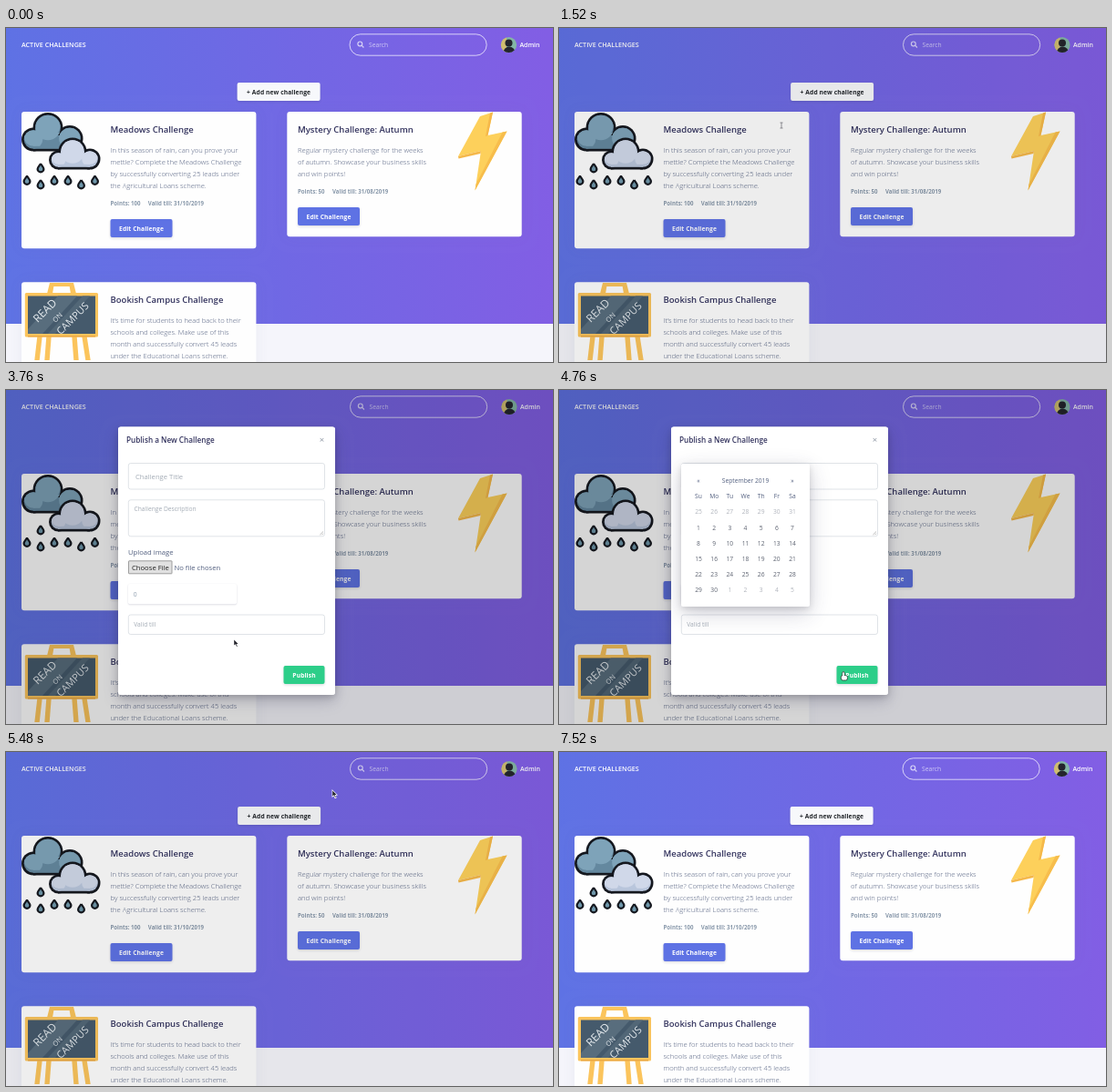
An HTML page with a canvas for the animation above (7.56 s loop, 600 by 367 pixels).

```html
<!DOCTYPE html>
<html lang="en">
<head>
<meta charset="utf-8">
<title>Active challenges</title>
<style>
html, body { margin: 0; width: 100%; height: 100%; overflow: hidden; background: #f5f5fb; }
canvas { display: block; width: 600px; height: 367px; }
</style>
</head>
<body>
<canvas id="stage"></canvas>
<script>
const W = 600, H = 367, LOOP = 7560;
const canvas = document.getElementById('stage');
const ctx = canvas.getContext('2d');
const dpr = window.devicePixelRatio || 1;
canvas.width = W * dpr;
canvas.height = H * dpr;

const INK = '#32325d', BODY = '#525f7f', MUTED = '#8898aa', HINT = '#a3abb5';
const BLUE = '#5e72e4', GREEN = '#2dce89', DARK = '#15181f';
const SMALL = 6.69, BASE = 7.65;

const clamp = v => Math.max(0, Math.min(1, v));
const ramp = (t, start, length) => clamp((t - start) / length);
const easeOut = p => 1 - (1 - p) ** 2;
const smooth = p => p * p * (3 - 2 * p);

// ---- drawing helpers ----
function text(str, x, y, size, color, weight = 400, align = 'left', spacing = 0) {
  ctx.font = `${weight} ${size}px "Open Sans", sans-serif`;
  ctx.letterSpacing = spacing + 'px';
  ctx.textAlign = align;
  ctx.fillStyle = color;
  ctx.fillText(str, x, y);
}

function box(x, y, w, h, r, fill, stroke, line = 0.6) {
  ctx.beginPath();
  ctx.roundRect(x, y, w, h, r);
  if (fill) { ctx.fillStyle = fill; ctx.fill(); }
  if (stroke) { ctx.strokeStyle = stroke; ctx.lineWidth = line; ctx.stroke(); }
}

function shadowBox(x, y, w, h, r, fill, blur, dy, color) {
  ctx.save();
  ctx.shadowColor = color;
  ctx.shadowBlur = blur * dpr;
  ctx.shadowOffsetY = dy * dpr;
  box(x, y, w, h, r, fill);
  ctx.restore();
}

function shape(points, fill) {
  ctx.beginPath();
  points.forEach(([x, y]) => ctx.lineTo(x, y));
  ctx.closePath();
  ctx.fillStyle = fill;
  ctx.fill();
}

function disc(x, y, r, fill) {
  ctx.beginPath();
  ctx.arc(x, y, r, 0, Math.PI * 2);
  ctx.fillStyle = fill;
  ctx.fill();
}

function button(label, x, y, w, fill, color) {
  shadowBox(x, y, w, 20, 2, fill, 3, 1.2, 'rgba(30,30,60,.16)');
  text(label, x + w / 2, y + 12.7, SMALL, color, 700, 'center', 0.1);
}

// ---- illustrations ----
function cloud(lobes, base, fill, shade) {
  const line = 2.7;
  const puff = (grow, color, dy = 0) => {
    lobes.forEach(([x, y, r]) => disc(x, y + dy, r + grow, color));
    const [x, y, w, h] = base;
    ctx.fillRect(x, y + dy, w, h + grow);
  };
  puff(0, DARK);
  puff(-line, shade);
  ctx.save();
  ctx.beginPath();
  lobes.forEach(([x, y, r]) => {
    ctx.moveTo(x + r - line, y);
    ctx.arc(x, y, r - line, 0, Math.PI * 2);
  });
  ctx.clip();
  puff(-line, fill, -3);
  ctx.restore();
}

function drop(x, y) {
  ctx.beginPath();
  ctx.moveTo(x, y - 4.5);
  ctx.bezierCurveTo(x + 1.5, y - 2, x + 3.4, y - 0.4, x + 3.4, y + 1.4);
  ctx.arc(x, y + 1.4, 3.4, 0, Math.PI);
  ctx.bezierCurveTo(x - 3.4, y - 0.4, x - 1.5, y - 2, x, y - 4.5);
  ctx.fillStyle = '#6f97aa';
  ctx.fill();
  ctx.strokeStyle = DARK;
  ctx.lineWidth = 2.2;
  ctx.stroke();
}

function rain() {
  cloud([[30, 122.5, 13], [46, 109.5, 16.5], [70, 121.5, 14.5]], [30, 118, 40, 17.5], '#7ea3b9', '#64889f');
  cloud([[57.5, 145, 10.5], [73, 136, 15.5], [92, 144, 11.5]], [57, 143, 35, 12.5], '#d0d8e9', '#b9c6dc');
  [[38, 153.5], [23, 167], [53, 167], [38, 171.5], [68, 167], [82.5, 171.5], [97.5, 167]].forEach(p => drop(...p));
}

function bolt() {
  shape([[520, 97], [534, 92.5], [528.5, 118], [549.5, 113.5], [514.5, 178.5], [521, 135], [496, 141]], '#fdd05b');
  shape([[534, 92.5], [528.5, 118], [526, 119], [531, 93.5]], '#f5b84a');
  shape([[549.5, 113.5], [514.5, 178.5], [515.4, 172], [544.5, 114.5]], '#f7bd4c');
  shape([[496, 141], [521, 135], [520.5, 138], [496.5, 143.5]], '#f5b84a');
}

function boardWord(word, x, y, size) {
  ctx.save();
  ctx.translate(x, y);
  ctx.rotate(-Math.PI / 4);
  text(word, 0, size * 0.36, size, '#e8edf0', 500, 'center');
  ctx.restore();
}

function easel() {
  const wood = '#fbc45c', edge = '#eca943';
  const leg = (top, foot) => shape([[top - 2.7, 339], [top + 2.7, 339], [foot + 2.7, 365], [foot - 2.7, 365]], wood);
  shape([[48, 280], [53, 280], [51, 292], [45, 292]], wood);
  shape([[69, 280], [74, 280], [77, 292], [71, 292]], wood);
  box(48, 280, 26, 4, 0, wood);
  leg(37, 34);
  leg(47, 45);
  leg(75, 77);
  leg(86, 90);
  box(20.8, 291, 80.2, 48.5, 1.5, wood);
  box(24, 338, 74, 1.5, 0, edge);
  box(24, 294.5, 74, 41.5, 0, '#455a6c');
  shape([[57, 294.5], [78, 294.5], [40, 336], [24, 336], [24, 331]], '#586d7d');
  shape([[84, 294.5], [92, 294.5], [54, 336], [46, 336]], '#526777');
  boardWord('READ', 42.5, 310.5, 12);
  boardWord('ON', 56.5, 318, 7.5);
  boardWord('CAMPUS', 73, 319, 11);
}

// ---- page ----
function card(x, y, h, title, lines, points, until, textX) {
  shadowBox(x, y, 257.4, h + 0.3, 3, '#fefefe', 15, 0, 'rgba(100,110,140,.08)');
  text(title, textX, y + 22.8, 9.5, INK, 600);
  lines.forEach((s, i) => text(s, textX, y + 44.5 + i * 13, BASE, BODY, 300));
  const foot = y + 34 + lines.length * 13;
  text('Points: ' + points, textX, foot + 17.3, 6.12, MUTED, 700);
  text('Valid till: ' + until, textX + (points > 99 ? 41.3 : 38), foot + 17.3, 6.12, MUTED, 700);
  button('Edit Challenge', textX, foot + 32, 68, BLUE, '#fff');
}

function header(shift) {
  text('ACTIVE CHALLENGES', 17, 20.8, 7.17, '#fff', 600);
  ctx.save();
  ctx.translate(shift, 0);
  box(377, 6.8, 150.2, 23.4, 11.7, null, 'rgba(255,255,255,.7)', 1);
  ctx.strokeStyle = 'rgba(255,255,255,.7)';
  ctx.lineWidth = 1.2;
  ctx.beginPath();
  ctx.arc(388.3, 17.4, 2.4, 0, Math.PI * 2);
  ctx.moveTo(390.1, 19.2);
  ctx.lineTo(392.4, 21.5);
  ctx.stroke();
  text('Search', 398, 20.9, SMALL, 'rgba(255,255,255,.65)');

  ctx.save();
  ctx.beginPath();
  ctx.arc(551.5, 18.5, 8.6, 0, Math.PI * 2);
  ctx.clip();
  box(542, 9, 20, 20, 0, '#83b5a6');
  box(542, 9, 7, 20, 0, '#d0bd70');
  disc(551.5, 16.5, 4, '#24252d');
  disc(552, 27, 6.5, '#24252d');
  ctx.restore();
  text('Admin', 563.4, 21, 7, '#fff', 600);
  button('+ Add new challenge', 253.6, 60, 91, '#f7f8fb', '#212529');
  ctx.restore();
}

function page(shift) {
  ctx.fillStyle = '#f5f5fb';
  ctx.fillRect(0, 0, W, H);
  const g = ctx.createLinearGradient(0, 178, W, 147);
  g.addColorStop(0, '#5e72e4');
  g.addColorStop(1, '#825ee4');
  ctx.fillStyle = g;
  ctx.fillRect(0, 0, W, 325);
  header(shift);
  card(17, 92, 150, 'Meadows Challenge', [
    'In this season of rain, can you prove your',
    'mettle? Complete the Meadows Challenge',
    'by successfully converting 25 leads under',
    'the Agricultural Loans scheme.'
  ], 100, '31/10/2019', 114.5);
  card(308.3, 92, 137, 'Mystery Challenge: Autumn', [
    'Regular mystery challenge for the weeks',
    'of autumn. Showcase your business skills',
    'and win points!'
  ], 50, '31/08/2019', 320);
  card(17, 279.3, 150, 'Bookish Campus Challenge', [
    'It\u2019s time for students to head back to their',
    'schools and colleges. Make use of this',
    'month and successfully convert 45 leads',
    'under the Educational Loans scheme.'
  ], 100, '30/09/2019', 114.5);
  rain();
  bolt();
  easel();
}

// ---- dialog ----
function field(y, h, hint, x, size) {
  box(134.3, y, 215.2, h, 2.5, '#fff', '#cad1d7');
  text(hint, x, y + h / 2 + size * 0.36, size, HINT);
}

function modal(alpha, dy) {
  ctx.save();
  ctx.globalAlpha = alpha;
  ctx.translate(0, dy);
  shadowBox(123, 40.5, 238, 294.5, 3, '#fff', 17, 7, 'rgba(50,50,93,.25)');
  shadowBox(123, 40.5, 238, 294.5, 3, '#fff', 7, 2.4, 'rgba(0,0,0,.17)');
  text('Publish a New Challenge', 132, 57.6, 8.2, INK, 600);
  text('\u00d7', 346.5, 57.6, 9.5, '#8e96a3', 400, 'center');
  field(80.5, 28.5, 'Challenge Title', 142, BASE);
  box(134.3, 120.8, 215.2, 40, 2.5, '#fff', '#cad1d7');
  text('Challenge Description', 140.5, 133.4, SMALL, HINT);
  ctx.beginPath();
  ctx.moveTo(344.3, 159.2); ctx.lineTo(348, 155.5);
  ctx.moveTo(346.5, 159.2); ctx.lineTo(348, 157.7);
  ctx.strokeStyle = '#777';
  ctx.lineWidth = 0.5;
  ctx.stroke();
  text('Upload image', 134, 180.6, BASE, BODY);
  box(134.5, 187.8, 47.5, 14, 0.5, '#e1e1e1', '#8a8a8a', 0.8);
  text('Choose File', 138, 197.6, BASE, '#222');
  text('No file chosen', 184.5, 197.6, BASE, BODY);
  shadowBox(134, 213, 119, 22.3, 2, '#fff', 2, 0.7, 'rgba(50,50,93,.2)');
  text('0', 139.8, 226.8, SMALL, MUTED);
  field(247, 21.5, 'Valid till', 140.2, SMALL);
  button('Publish', 304.5, 303, 45, GREEN, '#fff');
  ctx.restore();
}

function picker(alpha, dy) {
  ctx.save();
  ctx.globalAlpha = alpha;
  ctx.translate(0, dy);
  shadowBox(134, 81, 141, 157, 2.5, '#fff', 24, 7, 'rgba(50,50,93,.22)');
  shadowBox(134, 81, 141, 157, 2.5, '#fff', 7, 2.4, 'rgba(0,0,0,.14)');
  const cell = (s, col, y, color) => text(s, 153 + col * 17.17, y + 2.4, SMALL, color, 400, 'center');
  cell('\u00ab', 0, 100, BODY);
  cell('September 2019', 3, 100, BODY);
  cell('\u00bb', 6, 100, BODY);
  ['Su', 'Mo', 'Tu', 'We', 'Th', 'Fr', 'Sa'].forEach((d, i) => cell(d, i, 117, BODY));
  for (let i = 0; i < 42; i++) {
    const n = i - 6;
    const day = n < 1 ? n + 31 : n > 30 ? n - 30 : n;
    cell(day, i % 7, 134 + Math.floor(i / 7) * 17.2, day === n ? '#5c6270' : '#b0b4bc');
  }
  ctx.restore();
}

// ---- pointer: time, x, y, look until the next stop ----
const STOPS = [
  [40, 420, 372, 'arrow'], [320, 350, 150, 'arrow'], [760, 350, 150, 'arrow'],
  [1000, 300, 72, 'hand'], [1240, 300, 72, 'arrow'], [1480, 244, 107, 'beam'],
  [1720, 244, 107, 'beam'], [2000, 236, 93, 'beam'], [2320, 236, 93, 'beam'],
  [2640, 232, 140, 'beam'], [3000, 215, 215, 'beam'], [3080, 215, 215, 'arrow'],
  [3240, 205, 240, 'arrow'], [3480, 205, 240, 'arrow'], [3760, 250, 274, 'arrow'],
  [4000, 256, 258, 'beam'], [4380, 256, 258, 'arrow'], [4640, 312, 310, 'hand'],
  [4840, 312, 310, 'arrow'], [5060, 346, 54, 'hand'], [5200, 346, 54, 'arrow'],
  [5480, 358, 42, 'arrow'], [5900, 358, 42, 'arrow'], [6200, 420, -12, 'arrow']
];

const LOOKS = {
  arrow() {
    shape([[-0.4, -0.9], [-0.4, 8], [1.5, 6.4], [2.8, 9.2], [4.7, 8.3], [3.5, 5.8], [6, 5.6]], '#fff');
    shape([[0.2, 0.5], [0.2, 6.6], [1.8, 5.3], [3.1, 8.1], [3.8, 7.8], [2.5, 5], [4.6, 4.9]], '#24242c');
  },
  hand() {
    box(-1.2, -0.4, 2.4, 7, 1.2, '#fff', '#222', 0.7);
    box(-2.6, 3.5, 7, 5.5, 2, '#fff', '#222', 0.7);
    box(-0.8, 1, 1.6, 5, 0.8, '#fff');
  },
  beam() {
    ctx.beginPath();
    ctx.moveTo(-1.5, -3); ctx.lineTo(1.5, -3);
    ctx.moveTo(0, -3); ctx.lineTo(0, 3);
    ctx.moveTo(-1.5, 3); ctx.lineTo(1.5, 3);
    ctx.strokeStyle = '#63636a';
    ctx.lineWidth = 0.7;
    ctx.stroke();
  }
};

function pointer(t) {
  const i = STOPS.findIndex(s => s[0] > t);
  if (i < 1) return;
  const [t0, x0, y0, look] = STOPS[i - 1], [t1, x1, y1] = STOPS[i];
  const p = smooth((t - t0) / (t1 - t0));
  ctx.save();
  ctx.translate(x0 + (x1 - x0) * p, y0 + (y1 - y0) * p);
  LOOKS[look]();
  ctx.restore();
}

function draw(t) {
  ctx.setTransform(dpr, 0, 0, dpr, 0, 0);
  const dim = 0.16 * (ramp(t, 1460, 150) - ramp(t, 5390, 150));
  page(dim > 0 ? 0.5 : 0);
  ctx.fillStyle = `rgba(0,0,0,${dim})`;
  ctx.fillRect(0, 0, W, H);

  const shown = ramp(t, 1620, 150) - ramp(t, 5180, 150);
  const slide = easeOut(ramp(t, 1620, 300)) - easeOut(ramp(t, 5180, 300));
  if (shown > 0) modal(shown, -24 * (1 - slide));

  const open = easeOut(ramp(t, 4400, 240)) - easeOut(ramp(t, 5060, 120));
  if (open > 0) picker(open, -8 * (1 - open));
  pointer(t);
}

const start = performance.now();
function tick() {
  draw((performance.now() - start) % LOOP);
  requestAnimationFrame(tick);
}
tick();
</script>
</body>
</html>
```
